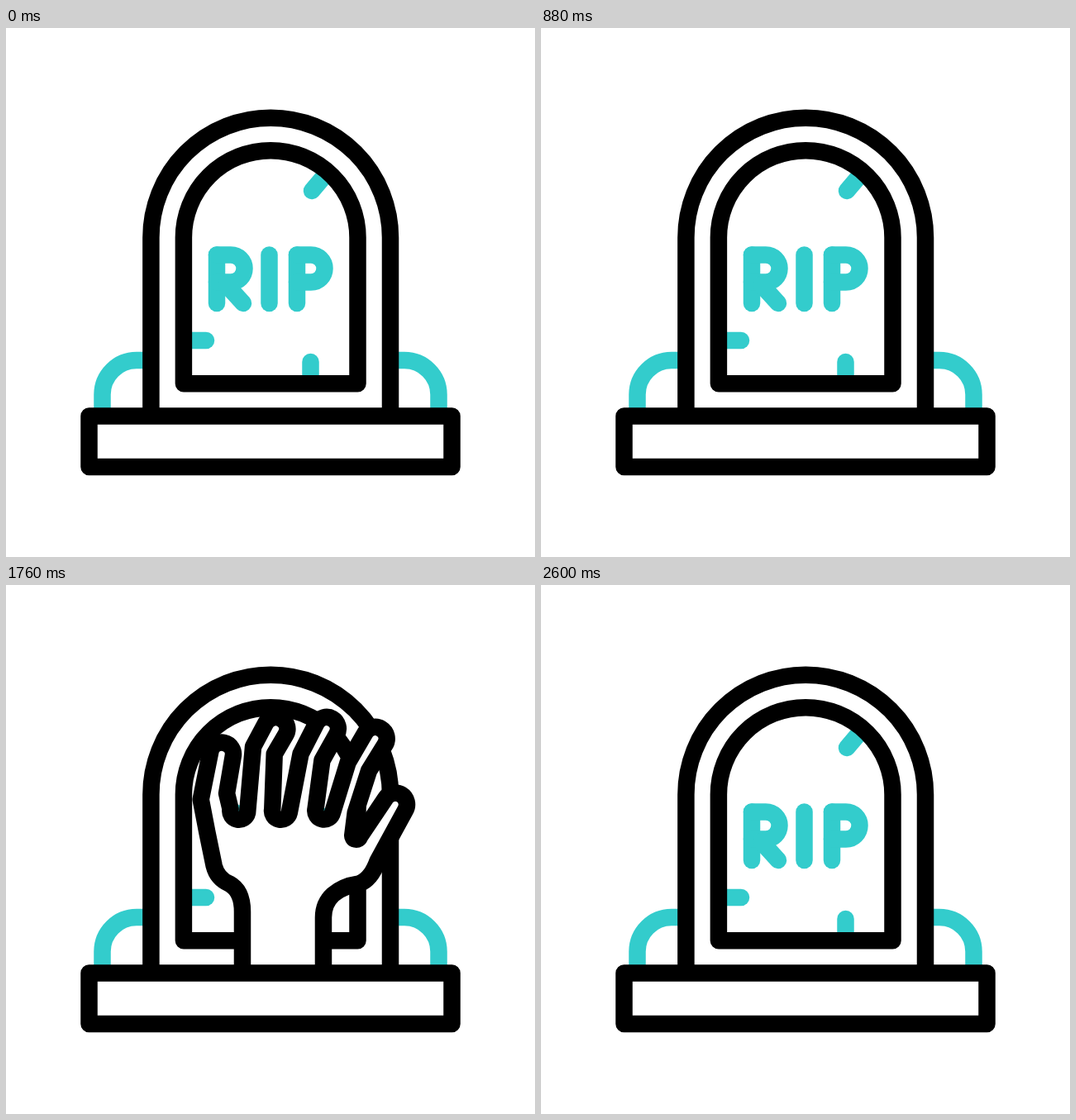
These frames come from a looping animation (640x640 px, 2800 ms). An HTML page with a canvas:

```html
<!DOCTYPE html>
<html lang="en">
<head>
<meta charset="utf-8">
<title>Tombstone</title>
<style>
  html, body { margin: 0; width: 100%; height: 100%; overflow: hidden; background: #fff; }
  canvas { display: block; width: 100vmin; height: 100vmin; }
</style>
</head>
<body>
<canvas id="stage" width="640" height="640"></canvas>
<script>
const ctx = document.getElementById('stage').getContext('2d');
const LOOP = 2800, STEP = 40, GROUND = 460;
const TEAL = '#33cccc', BLACK = '#000', WHITE = '#fff';
const RAD = Math.PI / 180;

const ease = u => (1 - Math.cos(Math.PI * u)) / 2;

// Eased value through [time, value] pairs.
function track(t, keys) {
  if (t <= keys[0][0]) return keys[0][1];
  for (let i = 1; i < keys.length; i++) {
    const [t0, v0] = keys[i - 1], [t1, v1] = keys[i];
    if (t < t1) return v0 + (v1 - v0) * ease((t - t0) / (t1 - t0));
  }
  return keys[keys.length - 1][1];
}

// Two dips of the stone, 320 ms each.
function dip(t, start) {
  const u = (t - start) / 320;
  return u > 0 && u < 2 ? 6.5 * (1 - Math.cos(2 * Math.PI * u)) / 2 : 0;
}

function shape(color, build, fill) {
  ctx.beginPath();
  build();
  if (fill) {
    ctx.fillStyle = fill;
    ctx.fill();
  }
  ctx.strokeStyle = color;
  ctx.stroke();
}

function line(color, x0, y0, x1, y1) {
  shape(color, () => { ctx.moveTo(x0, y0); ctx.lineTo(x1, y1); });
}

function bushes() {
  for (const side of [-1, 1]) {
    shape(TEAL, () => {
      ctx.moveTo(320 + side * 145, 402);
      ctx.lineTo(320 + side * 162, 402);
      ctx.arcTo(320 + side * 203.5, 402, 320 + side * 203.5, 443.5, 41.5);
      ctx.lineTo(320 + side * 203.5, 475);
    });
  }
}

function arch(radius, bottom, closed, fill) {
  shape(BLACK, () => {
    ctx.moveTo(320.2 - radius, bottom);
    ctx.arc(320.2, 253.5, radius, Math.PI, 0);
    ctx.lineTo(320.2 + radius, bottom);
    if (closed) ctx.closePath();
  }, fill);
}

function bowl(x) {
  shape(TEAL, () => {
    ctx.moveTo(x, 274.5);
    ctx.lineTo(x + 17, 274.5);
    ctx.arc(x + 17, 291, 16.5, -Math.PI / 2, Math.PI / 2);
    ctx.lineTo(x, 307.5);
  });
}

function lettering() {
  for (const x of [255, 318.5, 352]) line(TEAL, x, 274.5, x, 333);
  bowl(255);
  bowl(352);
  line(TEAL, 266, 310, 287, 333);
}

function stone(dy) {
  ctx.save();
  ctx.translate(0, dy);
  arch(144.8, 480, false, WHITE);
  line(TEAL, 370, 197, 387, 177);
  line(TEAL, 216, 378, 242, 378);
  line(TEAL, 368.5, 404, 368.5, 428);
  arch(105.3, 430.3, true);
  ctx.translate(0, dy);
  lettering();
  ctx.restore();
}

// The palm turns on the wrist while the forearm stays upright.
function hand({ x, y, turn }) {
  const a = turn * RAD, cos = Math.cos(a), sin = Math.sin(a);
  const at = (px, py) => {
    const dx = px - 335, dy = py - 527;
    return [x + dx * cos - dy * sin, y + dx * sin + dy * cos];
  };
  const to = (px, py) => ctx.lineTo(...at(px, py));
  const tip = (px, py, dir) =>
    ctx.arc(...at(px, py), 14, (dir - 90) * RAD + a, (dir + 90) * RAD + a);
  const valley = (px, py, r) =>
    ctx.arc(...at(px, py), r, Math.PI + a, a, true);

  shape(BLACK, () => {
    ctx.moveTo(x - 49, y + 300);
    ctx.lineTo(x - 49, y - 45);
    ctx.bezierCurveTo(x - 49, y - 62, x - 54, y - 73, ...at(254.5, 464));
    ctx.quadraticCurveTo(...at(239, 461), ...at(232, 447));
    to(215, 409);
    to(199, 372);
    tip(211.8, 313, -90);
    to(228, 358);
    valley(247, 375.5, 10.5);
    to(247, 296);
    tip(269, 269, -71);
    to(274, 299);
    valley(296.5, 364.5, 10.5);
    to(305, 292);
    tip(329, 255.5, -72);
    to(332, 294);
    valley(347.5, 353, 10.5);
    to(363, 290);
    tip(389, 254.5, -71);
    to(390, 294);
    to(385, 347);
    valley(392, 374, 4.5);
    tip(430, 327, -71);
    to(424, 398);
    ctx.quadraticCurveTo(...at(421, 422), ...at(408, 430));
    ctx.bezierCurveTo(x + 66, y - 75, x + 49, y - 61, x + 49, y - 38);
    ctx.lineTo(x + 49, y + 300);
  }, WHITE);
}

function base() {
  shape(BLACK, () => ctx.rect(100.5, 469.5, 439, 61.5), WHITE);
}

function draw(t) {
  ctx.fillStyle = WHITE;
  ctx.fillRect(0, 0, 640, 640);
  ctx.lineWidth = 20.5;
  ctx.lineCap = ctx.lineJoin = 'round';

  ctx.save();
  ctx.beginPath();
  ctx.rect(0, 0, 640, GROUND);
  ctx.clip();
  bushes();
  stone(dip(t, 220) + dip(t, 1940));
  if (t > 860 && t < 2220) {
    hand({
      x: track(t, [[1752, 335], [2220, 305]]),
      y: track(t, [[860, 790], [1370, 440], [1752, 440], [2220, 790]]),
      turn: track(t, [[1300, 0], [1752, 12.5], [2220, 0.5]])
    });
  }
  ctx.restore();
  base();
}

function tick() {
  const t = performance.now() % LOOP;
  draw(Math.floor(t / STEP) * STEP);
  requestAnimationFrame(tick);
}
tick();
</script>
</body>
</html>
```
